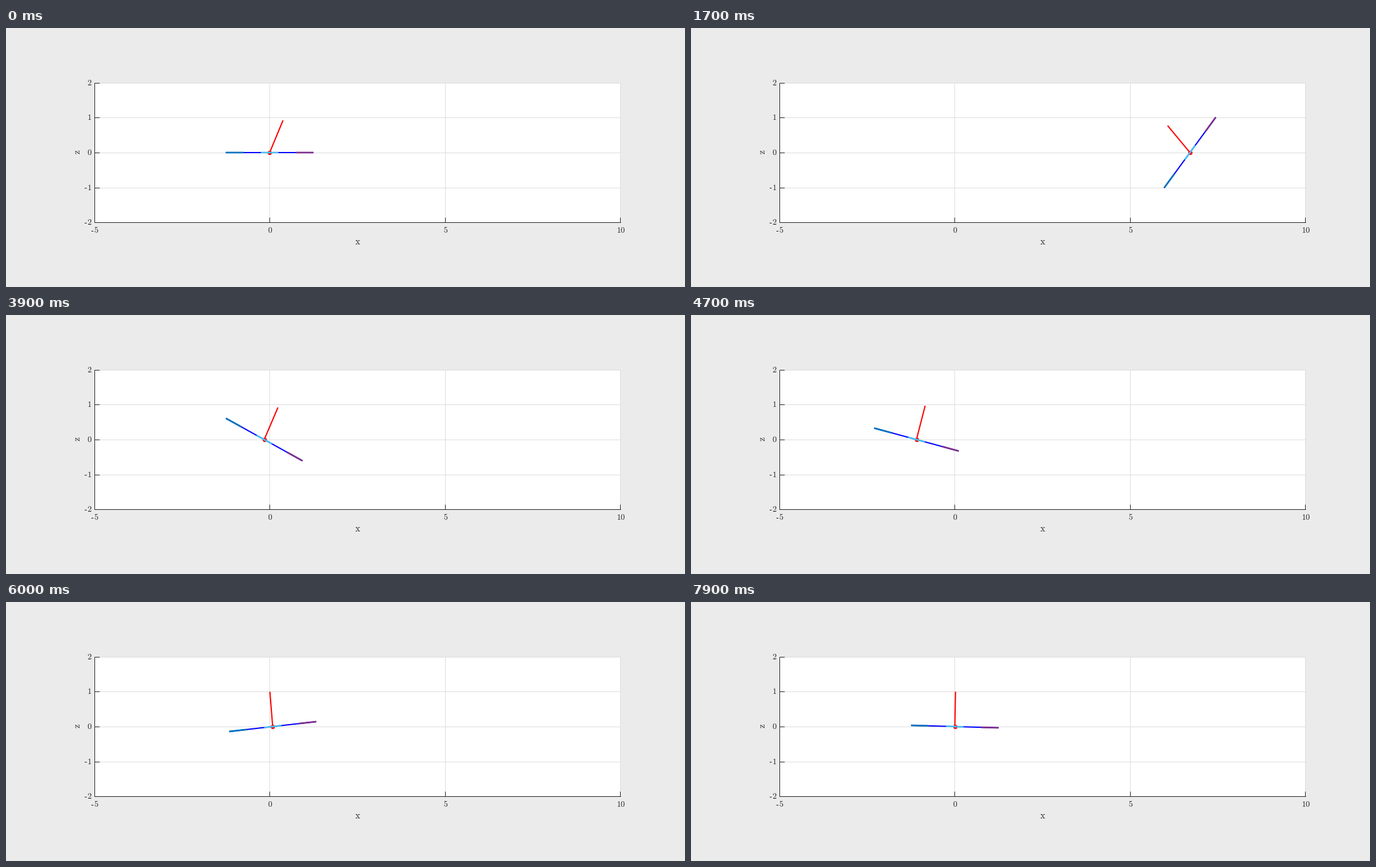
Animation, 1098 px wide and 420 px high, one loop 8 s. Source, as a matplotlib script:

```python
import numpy as np
import matplotlib.pyplot as plt
from matplotlib.animation import FuncAnimation

plt.rcParams["mathtext.fontset"] = "cm"

W, H, DPI = 1098, 420, 100
PX = 72 / DPI                       # points per pixel
LEFT, RIGHT, MID = 143, 993, 202    # plot edges and height of z = 0
UNIT = (RIGHT - LEFT) / 15
TOP, BOTTOM = MID - 2 * UNIT, MID + 2 * UNIT
INK, GRID = "#262626", "#dedede"
STEP, FRAMES = 100, 80

# Key poses: time (s), position, beam tilt and rod lean (degrees)
KEYS = [(0, 0, 0, 22.5),
        (.3, .066, -36, 27.5),
        (.6, .65, -55, 29.3),
        (.9, 2.0, -37, 20),
        (1.3, 4.61, 17, -11.5),
        (1.7, 6.715, 53.9, -39.6),
        (2.1, 7.4, 59, -43.8),
        (2.8, 5.255, 18.7, -18.1),
        (3.3, 2.47, -13, 6),
        (3.9, -.155, -29.1, 23.1),
        (4.7, -1.09, -15.2, 14.4),
        (5.4, -.464, 1.2, 2.5),
        (6.0, .087, 6.5, -4.6),
        (6.8, .27, 3.7, -4.1),
        (7.9, .005, -1.6, 1.1)]


def spline(t, y, at):
    """Cubic spline, at rest at the start and natural at the end."""
    h, n = np.diff(t), len(t)
    slope = np.diff(y) / h
    a, b = np.eye(n), np.zeros(n)
    a[0, :2] = 2 * h[0], h[0]
    b[0] = 6 * slope[0]
    for i in range(1, n - 1):
        a[i, i - 1:i + 2] = h[i - 1], 2 * (h[i - 1] + h[i]), h[i]
        b[i] = 6 * (slope[i] - slope[i - 1])
    m = np.linalg.solve(a, b)
    i = np.clip(np.searchsorted(t, at, side="right") - 1, 0, n - 2)
    u, v = at - t[i], t[i + 1] - at
    return ((m[i] * v**3 + m[i + 1] * u**3) / (6 * h[i])
            + (y[i] / h[i] - m[i] * h[i] / 6) * v
            + (y[i + 1] / h[i] - m[i + 1] * h[i] / 6) * u)


times = np.arange(FRAMES) * STEP / 1000
key_t, *tracks = np.array(KEYS, float).T
pos, tilt, lean = (spline(key_t, track, times) for track in tracks)
tilt, lean = np.radians(tilt), np.radians(lean)


def to_px(x, z):
    return LEFT + (x + 5) * UNIT, MID - z * UNIT


fig = plt.figure(figsize=(W / DPI, H / DPI), dpi=DPI, facecolor="#ebebeb")
ax = fig.add_axes([0, 0, 1, 1])
ax.set_xlim(0, W)
ax.set_ylim(H, 0)
ax.axis("off")


def line(xs, ys, color, width, z, snap=False):
    return ax.plot(xs, ys, color=color, lw=width * PX, zorder=z, snap=snap,
                   solid_capstyle="butt")[0]


def rule(xs, ys, color, z):
    """One-pixel line on the pixel grid."""
    line(xs, ys, color, 1, z, snap=True)


def number(value, x, base, align):
    """Tick label with a short hyphen for negative values."""
    em = 13.33
    digits = str(abs(value))
    dash = em / 3 if value < 0 else 0
    width = len(digits) * em / 2 + dash
    x0 = x - width * {"center": .5, "right": 1}[align]
    if dash:
        line([x0 + .4, x0 + 3.6], [base - 2.9] * 2, INK, 1.1, 5)
    ax.text(x0 + dash, base, rf"$\mathrm{{{digits}}}$", fontsize=em * PX,
            color=INK, ha="left", va="baseline")


ax.add_patch(plt.Rectangle((LEFT, TOP), RIGHT - LEFT, BOTTOM - TOP,
                           fc="white", ec="none", zorder=0))
for x in (-5, 0, 5, 10):
    px = to_px(x, 0)[0]
    rule([px, px], [TOP, BOTTOM], GRID, 1)
    rule([px, px], [BOTTOM - 8, BOTTOM], INK, 3)
    number(x, px + .3, 332.4, "center")
for z in range(-2, 3):
    pz = to_px(0, z)[1]
    rule([LEFT, RIGHT + 1], [pz, pz], GRID, 1)
    rule([LEFT, LEFT + 8], [pz, pz], INK, 3)
    number(z, 138, pz + 4, "right")
rule([LEFT, LEFT], [TOP, BOTTOM], INK, 3)
rule([LEFT, RIGHT + 1], [BOTTOM, BOTTOM], INK, 3)
ax.text(569, 350.8, r"$\mathrm{x}$", fontsize=14.67 * PX, color=INK,
        ha="center", va="baseline")
ax.text(115.2, 201.5, r"$\mathrm{z}$", fontsize=14.67 * PX, color=INK,
        ha="center", va="center", rotation=90)

# Each body part: start and end along the beam, colour, width, layer
PARTS = [(-1.25, 1.25, "#0000ff", 2, 6),
         (-1.25, -.75, "#0072bd", 2.67, 9),
         (.75, 1.25, "#7e2f8e", 2.67, 9),
         (-.25, .25, "#4dbeee", 2.67, 9)]
beam = [line([], [], c, w, z) for _, _, c, w, z in PARTS]
rod = line([], [], "#ff0000", 2, 7)
hub = ax.plot([], [], "o", color="#ff0000", ms=7 * PX, mew=0, zorder=8,
              snap=False)[0]


def draw(i):
    x, a, b = pos[i], tilt[i], lean[i]
    for part, (r0, r1, *_) in zip(beam, PARTS):
        r = np.array([r0, r1])
        part.set_data(*to_px(x + r * np.cos(a), r * np.sin(a)))
    r = np.array([0, 1])
    rod.set_data(*to_px(x + r * np.sin(b), r * np.cos(b)))
    hub.set_data(*to_px(np.array([x]), np.array([0])))
    return [*beam, rod, hub]


anim = FuncAnimation(fig, draw, frames=FRAMES, interval=STEP, repeat=True,
                     repeat_delay=0)
plt.show()
```
